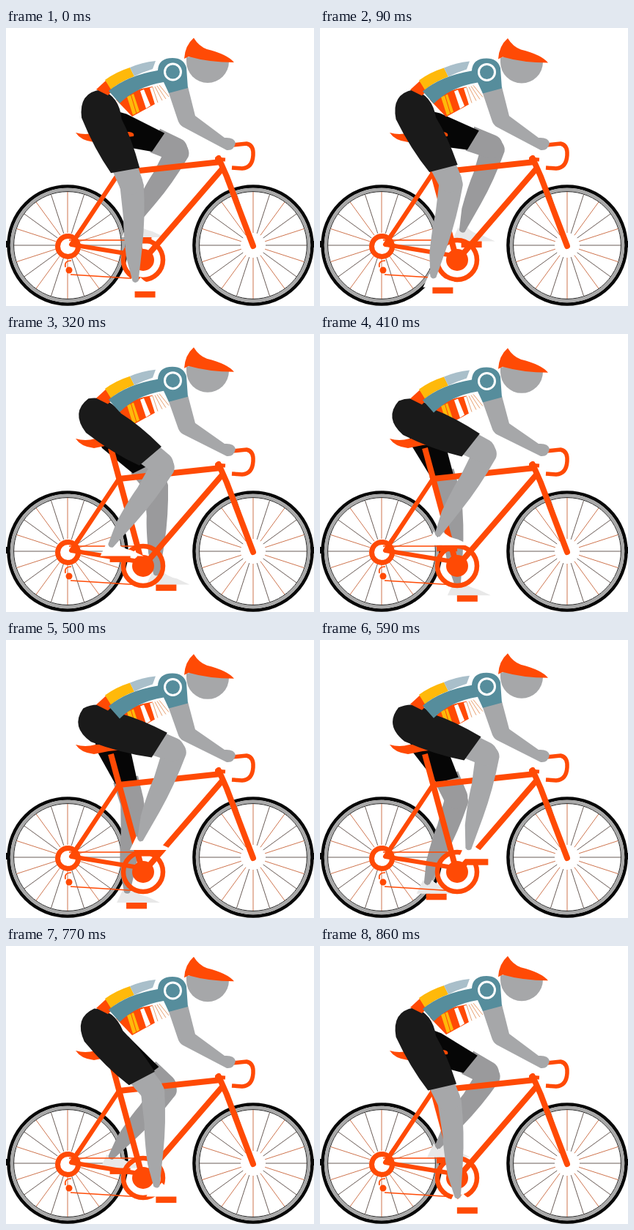
An HTML page for the animation above (0.9 s loop, 420 by 380 pixels).

```html
<!DOCTYPE html>
<html lang="en">
<head>
<meta charset="utf-8">
<title>Cyclist</title>
<style>
html, body { margin: 0; width: 100%; height: 100%; overflow: hidden; background: #fff; }
svg { display: block; width: 420px; height: 380px; }
.line { fill: none; stroke: #ff4a05; }
.or { fill: #ff4a05; }
.teal { fill: #568d9c; }
.yel { fill: #ffb90a; }
.skin { fill: #a6a7a9; }
</style>
</head>
<body>
<svg viewBox="0 0 420 380">
  <defs>
    <path id="nearThigh" d="M93-19Q52-24 22-21Q-8-30-26-10Q-34 20 0 29Q45 29 85 20Z"/>
    <path id="farThigh" d="M71-15L13-19L-20-15L-10 22L12 27L65 15Z"/>
    <path id="knee" d="M-34-18L-2-16.5A16.5 16.5 0 0 1 0 16L-34 17Z"/>
    <path id="shin" d="M0-16.5Q45-17 85-11L131-4Q135 0 131 4L100 11Q65 14 45 13L0 16A16.5 16.5 0 0 1 0-16.5Z"/>
    <path id="shoe" d="M-14 14L-5-5L0 3L7-5Q14 3 28 6L45 14Z"/>
  </defs>

  <g id="wheels"></g>
  <g id="far"></g>

  <path class="or" d="M95 143Q108 147 122 143L168 142Q176 143 174 148L140 152L120 156Q102 154 95 143Z"/>
  <g class="line" stroke-width="8">
    <circle cx="84.5" cy="298.5" r="14" stroke-width="7" fill="#fff"/>
    <circle cx="337" cy="298" r="8" fill="#fff" stroke="none"/>
    <path d="M143 156L184 308M154 198L293 183M297 190L192 312"/>
    <path d="M290 178L301 203L337 298" stroke-linecap="round"/>
    <path d="M285 179L299 180" stroke-width="5"/>
    <path d="M154 198L89 296L187 312" stroke-width="6" stroke-linejoin="round"/>
    <path d="M309 160L328 158Q338 160 337 174Q336 191 322 192L308 191" stroke-width="5.5"/>
    <circle cx="187" cy="317" r="27" stroke-width="6.5"/>
    <circle cx="187" cy="317" r="15" stroke="none" class="or"/>
    <path d="M86 290H187M88 337L183 343M81 327Q79 318 89 318" stroke-width="1.6"/>
    <circle cx="86" cy="331" r="4.5" stroke="none" class="or"/>
  </g>

  <g class="torso">
    <path class="or" d="M150 98Q173 84 200 80L203 104L172 121Z"/>
    <path class="yel" d="M165 94L174 90L182 114L173 119Z"/>
    <path d="M170 90L178 117" class="line" stroke-width="1"/>
    <path d="M183 86L188 84L197 106L191 110Z" fill="#fff"/>
    <path d="M196 82L212 77L222 94L203 104Z" fill="#fff"/>
    <path d="M200 81L207 102M203 80L213 99M206 79L218 97M209 78L222 94" fill="none" stroke="#e8a070"/>
  </g>

  <g id="near"></g>

  <path id="arm" class="skin"/>
  <g class="torso">
    <path class="or" d="M123 84L136 72L146 85L139 92Z"/>
    <path class="yel" d="M135 71Q150 60 169 54L175 66Q156 73 143 84Z"/>
    <path d="M169 54Q185 47 204 45L200 56Q187 60 175 66Z" fill="#a9bfca"/>
    <path class="teal" d="M140 86Q165 65 207 58Q208 41 227 41Q242 41 246 54L248 82L222 89L215 74Q178 80 155 103Z"/>
    <circle cx="227.5" cy="60" r="11" fill="none" stroke="#fff" stroke-width="3"/>
  </g>
  <g id="head">
    <path class="skin" d="M246 40L270 36L304 46A29 29 0 0 1 246 46Z"/>
    <path class="or" d="M256 13.5Q244 24 243 42L249 39Q277 47 311 47Q302 36 274 29Q263 25 256 13.5Z"/>
  </g>
</svg>
<script>
const NS = "http://www.w3.org/2000/svg";
const STARTS = [0, 50, 90, 140, 180, 230, 270, 320, 360, 410,
                450, 500, 550, 590, 640, 680, 730, 770, 820, 860];
const LOOP = 900, RAD = Math.PI / 180;
const $ = id => document.getElementById(id);

function add(parent, tag, attrs) {
  const el = document.createElementNS(NS, tag);
  for (const k in attrs) el.setAttribute(k, attrs[k]);
  return parent.appendChild(el);
}

function wheel(cx, cy, tickX) {
  const g = add($("wheels"), "g", { fill: "none" });
  const ring = (r, stroke, w) => add(g, "circle", { cx, cy, r, stroke, "stroke-width": w });
  ring(80.5, "#080808", 4.6);
  ring(76, "#a9a9a9", 4.4);
  ring(73.4, "#222", 1);
  for (let i = 0; i < 20; i++) {
    const a = i * 18 * RAD, c = Math.cos(a), s = Math.sin(a);
    add(g, "line", {
      x1: cx + 17 * c, y1: cy + 17 * s, x2: cx + 73 * c, y2: cy + 73 * s,
      stroke: i % 2 ? "#c9663c" : "#5a4a44", "stroke-width": 0.9
    });
  }
  add(g, "rect", { x: tickX, y: 291, width: 3, height: 9, fill: "#080808" });
}

function makeLeg(side, thigh, shin, skin, shorts, shoeColor) {
  const root = $(side);
  const use = (parent, id, fill) => add(parent, "use", { href: "#" + id, fill });
  const pedal = add(root, "rect", { width: 28, height: 9, class: "or" });
  const shoe = use(root, "shoe", shoeColor);
  const lower = add(root, "g", {});
  use(lower, "shin", skin).setAttribute("transform", `scale(${shin / 131} 1)`);
  const upper = add(root, "g", {});
  use(upper, "knee", skin).setAttribute("x", thigh);
  use(upper, side + "Thigh", shorts);
  return { thigh, shin, pedal, shoe, lower, upper };
}

const place = (el, x, y, deg = 0) =>
  el.setAttribute("transform", `translate(${x} ${y}) rotate(${deg})`);

// Two-bone solve from hip to the ankle above the pedal
function poseLeg(leg, hx, hy, deg) {
  const { thigh, shin } = leg;
  const px = 187 + 37 * Math.cos(deg * RAD), py = 327 + 37 * Math.sin(deg * RAD);
  const ax = px - 13, ay = py - 18, dx = ax - hx, dy = ay - hy;
  const d = Math.min(Math.hypot(dx, dy), thigh + shin);
  const bend = Math.acos((thigh * thigh + d * d - shin * shin) / (2 * thigh * d));
  const a = Math.atan2(dy, dx) - bend;
  const kx = hx + thigh * Math.cos(a), ky = hy + thigh * Math.sin(a);
  place(leg.pedal, px - 14, py - 4.5);
  place(leg.shoe, ax, ay);
  place(leg.lower, kx, ky, Math.atan2(ay - ky, ax - kx) / RAD);
  place(leg.upper, hx, hy, a / RAD);
}

wheel(84, 297, 0);
wheel(337, 297, 417);
const far = makeLeg("far", 97, 122, "#9a9a9c", "#060606", "#e8e8e8");
const near = makeLeg("near", 111, 131, "#a6a7a9", "#1a1a1a", "#fff");
const torso = document.querySelectorAll(".torso");

function draw(now) {
  const t = now % LOOP;
  const step = STARTS.filter(s => s <= t).length - 1;
  const turn = step * 18, sway = Math.cos(turn * RAD);
  const bob = 2.3 * (1 - sway), elbow = bob / 2;
  poseLeg(near, 128 + 2 * sway, 112, 86 + turn);
  poseLeg(far, 145, 130, 266 + turn);
  torso.forEach(g => place(g, 0, bob));
  place($("head"), 0, 3 * (1 - sway));
  $("arm").setAttribute("d",
    `M221 ${86 + bob}L248 ${80 + bob}L258 ${120 + elbow}L298 150Q311 149 313 157` +
    `Q311 168 301 167L241 ${135 + elbow}Q236 ${132 + elbow} 234 ${125 + elbow}Z`);
}

function tick() {
  draw(performance.now());
  requestAnimationFrame(tick);
}
tick();
</script>
</body>
</html>
```
